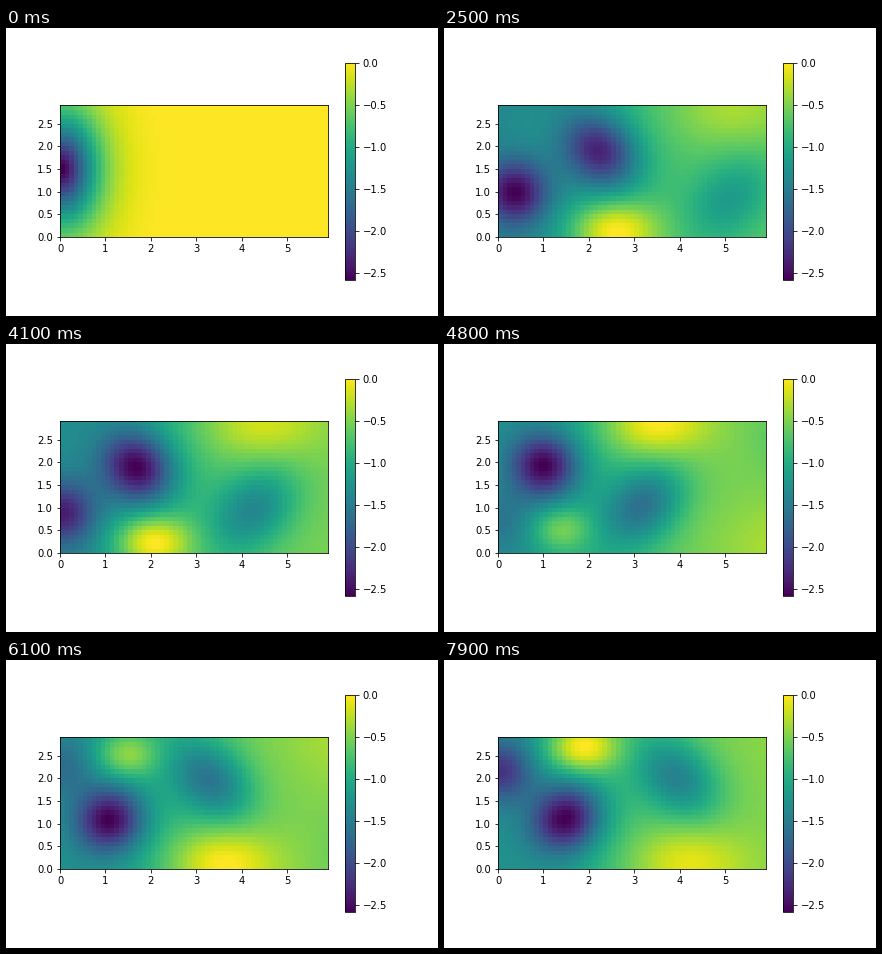
Recreate the animation shown at these times as a matplotlib script. Size 432 px wide and 288 px high, loop 8 s.

```python
import numpy as np
import matplotlib.pyplot as plt
from matplotlib.animation import FuncAnimation

plt.rcParams.update({"font.family": "DejaVu Sans", "font.size": 10})

FRAMES, STEP = 80, 100
V_MIN, V_MAX = -2.58, 0.0
MID = 1.45

xe, ye = np.linspace(0, 5.9, 60), np.linspace(0, 2.9, 30)
X, Y = np.meshgrid(xe[:-1], ye[:-1])

# Strength of a vortex and of its opposite high over its age
AGE = [-1.15, -0.95, -0.69, -0.34, 0, 0.3, 0.66, 1, 1.3, 1.66, 2.2, 2.6]
LOW = [0, 0.12, 0.38, 0.52, 0.55, 0.60, 0.55, 0.36, 0.34, 0.22, 0.04, 0]
HIGH = [0, 0, 0, 0.02, 0.22, 0.42, 0.42, 0.30, 0.20, 0.14, 0.06, 0]


def smooth(v):
    v = np.clip(v, 0, 1)
    return v * v * (3 - 2 * v)


def bump(cx, cy, sx, sy, shear=0.0):
    dx, dy = X - cx, Y - cy
    return np.exp(-0.5 * (((dx + shear * dy) / sx) ** 2 + (dy / sy) ** 2))


def first_age(t):
    """Age of the first vortex in half periods; shedding settles by 2.5 s."""
    lag = t - 2.5
    return 2.658 + 2.342 * lag + 0.203 * min(lag, 0) ** 2


def vortex(k, s):
    side = 1 if k % 2 == 0 else -1
    grow = np.clip(s, 0, 2)
    x = max(0.9 + 1.75 * s + 0.3 * s**2 + 0.1 * s**3, 0)
    y = MID + side * (0.38 + 0.2 * (s - 0.5) ** 2)
    low = bump(x, y, 0.5 + 0.08 * grow, 0.48 + 0.12 * grow,
               0.3 * side * min(grow, 1))
    field = -np.interp(s, AGE, LOW) * low
    if k > 0:
        hx = x + 0.35 - 0.05 * s - 0.1 * s**2
        hy = MID - side * np.clip(0.95 + 0.8 * s, 0.8, 1.38)
        field += np.interp(s, AGE, HIGH) * bump(
            hx, hy, 0.45 + 0.35 * grow, 0.36 + 0.16 * grow)
    return field


def street(t):
    field = 0.5 + 0.32 * (1 - np.exp(-((X / 2.9) ** 2)))
    s0 = first_age(t)
    for k in range(22):
        s = s0 - k
        if AGE[0] < s < AGE[-1]:
            field = field + vortex(k, s)
    start = np.exp(-0.5 * ((t - 1.3) / 0.3) ** 2)
    return field + 0.28 * start * bump(3.7 + 2.5 * (t - 1.3), 1.85, 1.0, 0.75, -0.4)


def pressure(t):
    """Field stretched to the full colour range."""
    rest = 1 - np.exp(-np.hypot(X / (0.75 + 0.5 * t), (Y - MID) / 1.17) ** 1.5)
    w = smooth(t / 1.15)
    p = (1 - w) * rest + w * street(t)
    p = (p - p.min()) / np.ptp(p)
    return V_MIN + (V_MAX - V_MIN) * p


fig = plt.figure(figsize=(6, 4), dpi=72, facecolor="white")
fig.subplots_adjust(left=0.125, right=0.9, bottom=0.125, top=0.88)
ax = fig.add_subplot()
mesh = ax.pcolormesh(xe, ye, pressure(0), cmap="viridis",
                     vmin=V_MIN, vmax=V_MAX, shading="flat")
ax.set_aspect("equal")
ax.set_xticks(range(6))
ax.set_yticks(np.arange(0, 3, 0.5))
fig.colorbar(mesh, ax=ax, ticks=np.arange(-2.5, 0.1, 0.5))


def update(i):
    mesh.set_array(pressure(i * STEP / 1000))
    return (mesh,)


anim = FuncAnimation(fig, update, frames=FRAMES, interval=STEP,
                     repeat=True, repeat_delay=0, blit=False)
plt.show()
```
